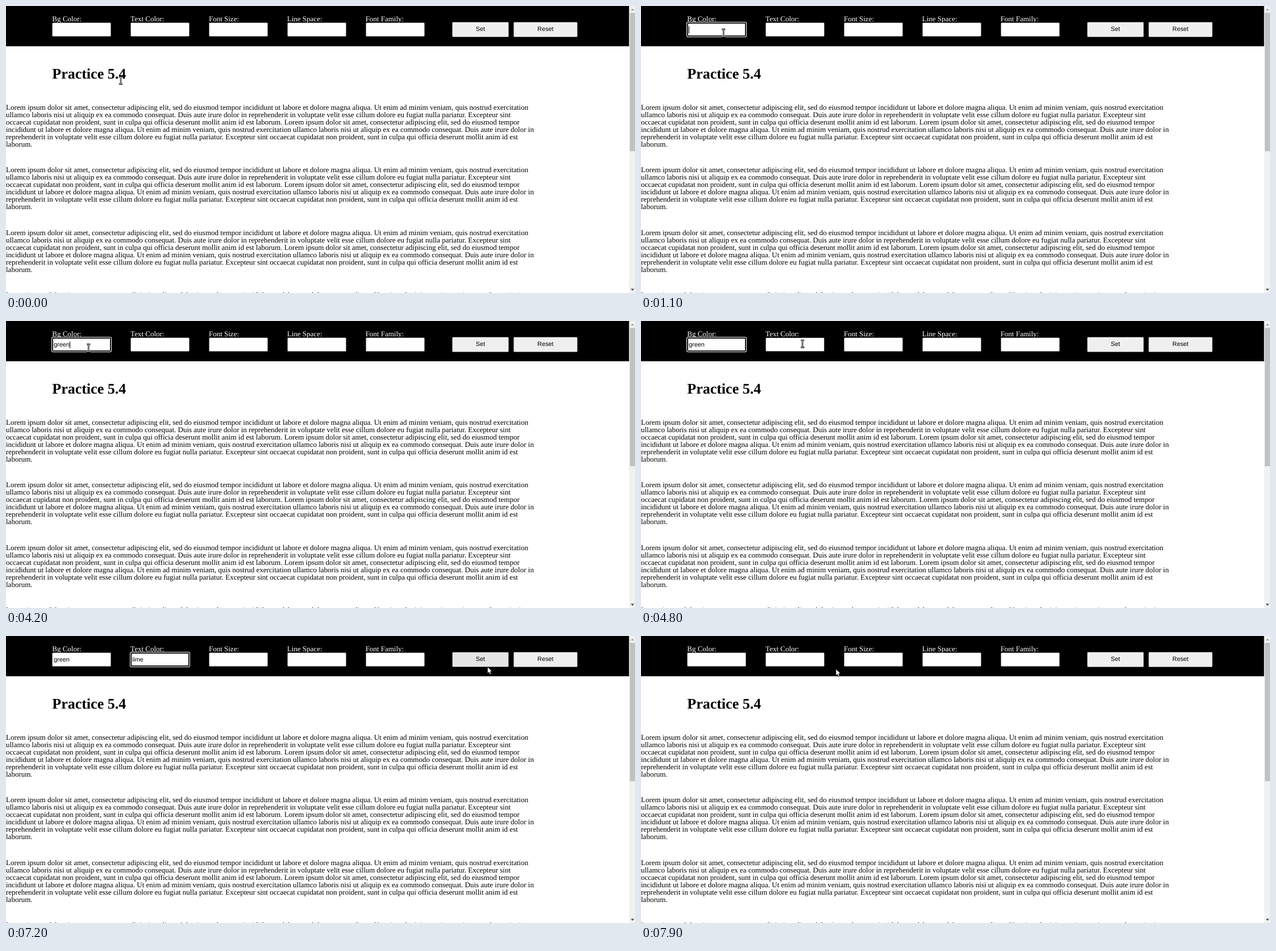
Write an HTML page that moves like this. It is 1107x506 px and loops after 8000 ms.

```html
<!DOCTYPE html>
<html lang="en">
<head>
<meta charset="utf-8">
<title>Practice 5.4</title>
<style>
html, body { margin: 0; width: 100%; height: 100%; overflow: hidden; background: #fff; }
#page {
  position: absolute; inset: 0; overflow: clip; contain: strict;
  font: 13px/13px "Liberation Serif", "Times New Roman", serif;
  text-rendering: geometricPrecision;
}
#page > * { position: absolute; margin: 0; box-sizing: border-box; }
#bar { left: 0; top: 0; width: 1096.5px; height: 71px; background: #000; }
label { top: 15px; line-height: 15px; color: #fff; white-space: nowrap; }
h1 { left: 81.25px; top: 105px; font-size: 26px; line-height: 29px; white-space: nowrap; }
p { left: 81.25px; width: 932px; }
.field, .button {
  border: 1px solid #767676; border-radius: 2px; color: #000;
  font: 10.833px/12px "Liberation Sans", Arial, sans-serif;
}
.field { top: 29px; width: 104px; height: 25px; padding: 6px 2px; background: #fff; white-space: nowrap; }
.field i { display: inline-block; width: 1px; height: 12px; vertical-align: top; background: #000; visibility: hidden; }
.field.caret i { visibility: visible; }
.button { top: 28px; height: 27px; line-height: 25px; text-align: center; background: #efefef; }
.hover { border-color: #4f4f4f; }
.button.hover { background: #e5e5e5; }
.field.focus { border: 2px solid #101010; padding: 5px 1px; box-shadow: 0 0 0 1px #fff; }
svg { left: 0; top: 0; }
</style>
</head>
<body>
<div id="page">
  <div id="bar"></div>
  <h1>Practice 5.4</h1>
</div>
<script>
const LOOP = 8000, STEP = 100;
const page = document.getElementById('page');

function add(tag, html, left, style = {}, cls = '') {
  const el = document.createElement(tag);
  el.innerHTML = html;
  el.className = cls;
  Object.assign(el.style, { left: left && left + 'px' }, style);
  return page.appendChild(el);
}

const names = ['Bg Color:', 'Text Color:', 'Font Size:', 'Line Space:', 'Font Family:'];
names.forEach((name, i) => add('label', name, 81.25 + 137.85 * i));
const fields = names.map((_, i) => add('div', '<span></span><i></i>', 81 + 138 * i, {}, 'field'));
const setButton = add('div', 'Set', 785, { width: '100px' }, 'button');
add('div', 'Reset', 893, { width: '113px' }, 'button');

const lorem = 'Lorem ipsum dolor sit amet, consectetur adipiscing elit, sed do eiusmod tempor ' +
  'incididunt ut labore et dolore magna aliqua. Ut enim ad minim veniam, quis nostrud exercitation ' +
  'ullamco laboris nisi ut aliquip ex ea commodo consequat. Duis aute irure dolor in reprehenderit ' +
  'in voluptate velit esse cillum dolore eu fugiat nulla pariatur. Excepteur sint occaecat cupidatat ' +
  'non proident, sunt in culpa qui officia deserunt mollit anim id est laborum. ';
for (let i = 0; i < 4; i++) add('p', lorem + lorem, 0, { top: 172 + 110.4 * i + 'px' });

// Scroll bar and the two pointer shapes
page.insertAdjacentHTML('beforeend', `
  <svg width="1107" height="506">
    <path d="M1096.5 0H1107V506H1096.5z" fill="#f1f1f1"/>
    <path d="M1098 12H1107V256H1098z" fill="#c1c1c1"/>
    <path d="M1099.4 7.9h6.4l-3.2-3.4z" fill="#a3a3a3"/>
    <path d="M1099.4 498.5h6.4l-3.2 3.4z" fill="#505050"/>
    <defs><path id="stem" d="M-3.2-6.2H-1L0-5.4L1-6.2H3.2M0-5.4V5.4M-3.2 6.2H-1L0 5.4L1 6.2H3.2" fill="none"/></defs>
    <g id="beam">
      <use href="#stem" stroke="#000" stroke-width="2.6"/>
      <use href="#stem" stroke="#fff" stroke-width=".9"/>
    </g>
    <path id="arrow" d="M.4.4V12.2L3 9.8L4.9 14.2L6.9 13.3L5.1 9H8.7z" fill="#fff" stroke="#000" stroke-width=".8"/>
  </svg>`);
const beam = document.getElementById('beam');
const arrow = document.getElementById('arrow');

// Time of the click into each field and of each letter
const entries = [
  { word: 'green', click: 1100, keys: [1900, 2200, 3300, 3300, 3300] },
  { word: 'lime', click: 5100, keys: [5600, 5800, 6000, 6200] }
];
const RESET = 7500;

// Each move starts where the one before it ended and bends towards a control point.
const rest = { x: 202, y: 131.4 };
const moves = [
  { start: 400, steps: 5, via: { x: 165, y: 75 }, to: { x: 145.2, y: 47.3 } },
  { start: 4400, steps: 5, via: { x: 418, y: 76 }, to: { x: 284.2, y: 40.2 } },
  { start: 6600, steps: 9, via: { x: 918, y: 235 }, to: { x: 843, y: 42 } },
  { start: RESET, steps: 5, via: { x: 560, y: 60 }, to: { x: 342.6, y: 57.6 } }
];

function pointer(t) {
  let from = rest, moving = false;
  for (const { start, steps, via, to } of moves) {
    if (t < start) break;
    const done = Math.min(1, (Math.floor((t - start) / STEP) + 1) / steps);
    const e = 1 - (1 - done) ** 2.3;
    const bend = k => (1 - e) ** 2 * from[k] + 2 * e * (1 - e) * via[k] + e * e * to[k];
    from = { x: bend('x'), y: bend('y') };
    moving = t < start + steps * STEP;
  }
  return { ...from, moving };
}

const over = (el, { x, y }) => {
  const box = el.getBoundingClientRect();
  return x >= box.left && x < box.right && y >= box.top && y < box.bottom;
};

function draw(t) {
  const spot = pointer(t);
  const active = t >= RESET ? -1 : entries.findLastIndex(entry => t >= entry.click);
  let overText = over(page.querySelector('h1'), spot);

  fields.forEach((field, i) => {
    const { word = '', click = 0, keys = [] } = entries[i] || {};
    const pressed = keys.filter(key => key <= t);
    const since = t - Math.max(click, ...pressed);
    const blink = since < 400 || (t + 800) % 1000 < 500;
    const hover = over(field, spot);
    overText ||= hover;
    field.firstChild.textContent = t < RESET ? word.slice(0, pressed.length) : '';
    field.classList.toggle('hover', hover);
    field.classList.toggle('focus', i === active);
    field.classList.toggle('caret', i === active && blink && !spot.moving);
  });
  setButton.classList.toggle('hover', over(setButton, spot) && t < RESET);

  for (const [el, shown] of [[beam, overText], [arrow, !overText]]) {
    el.setAttribute('transform', `translate(${spot.x} ${spot.y})`);
    el.style.display = shown ? '' : 'none';
  }
}

let origin;
function tick(now) {
  origin ??= now;
  draw((now - origin) % LOOP);
  requestAnimationFrame(tick);
}
draw(0);
requestAnimationFrame(tick);
</script>
</body>
</html>
```
